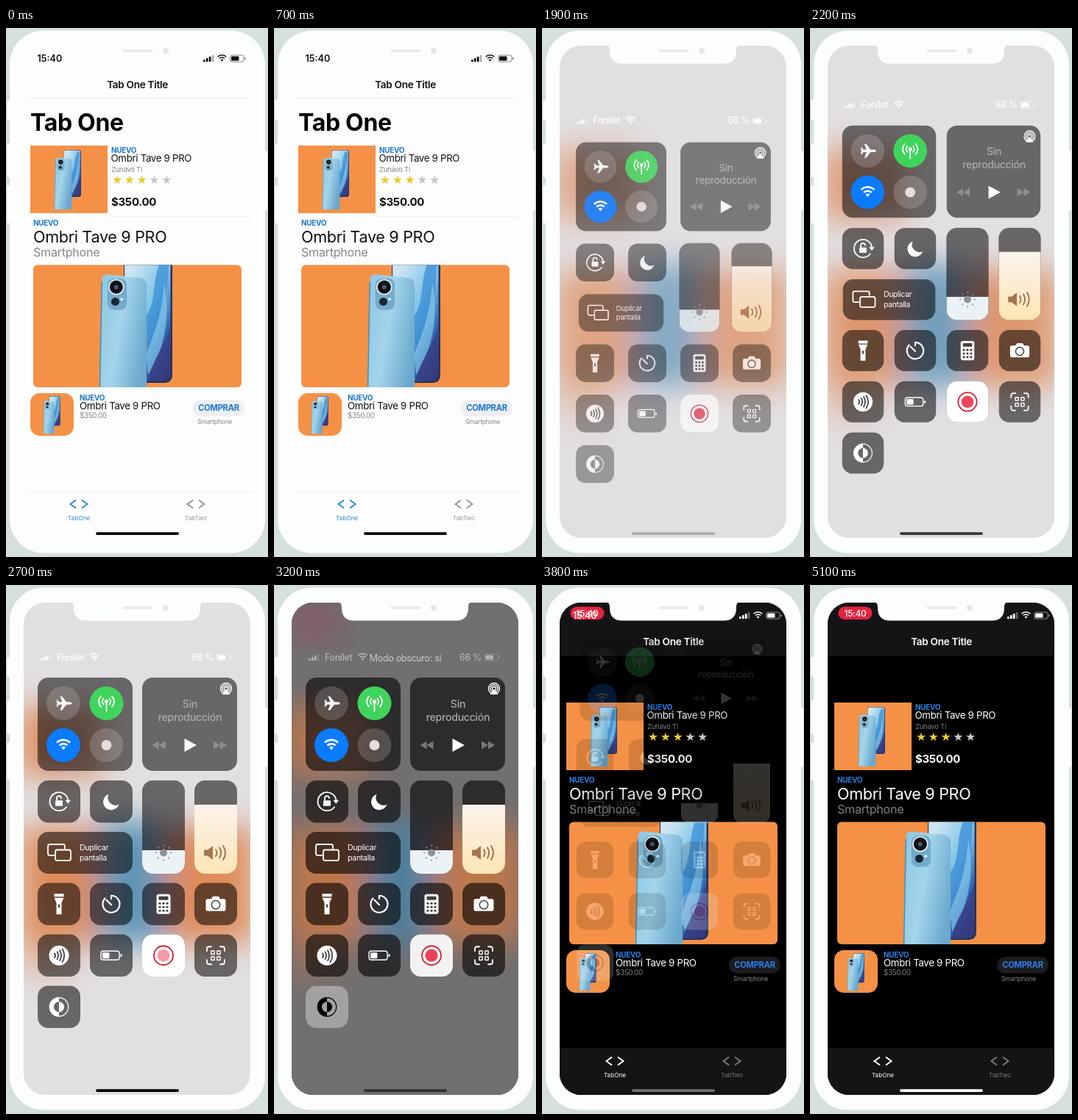
An HTML page for the animation above (5.2 s loop, 356 by 720 pixels).

```html
<!DOCTYPE html>
<html lang="es">
<head>
<meta charset="utf-8">
<style>
  html, body { margin: 0; width: 100%; height: 100%; overflow: hidden; background: #d5dfdc; }
  svg { display: block; width: 356px; height: 720px; font-family: Inter, sans-serif; letter-spacing: -.02em; }
  .tint { fill: #000; fill-opacity: var(--tint); }
  .line { fill: none; stroke: #fff; stroke-width: 1.8; stroke-linecap: round; stroke-linejoin: round; }
</style>
</head>
<body>
<svg id="stage" viewBox="0 0 356 720"></svg>
<script>
const LOOP = 5200, STEP = 100;
const PRODUCT = 'Ombri Tave 9 PRO', MAKER = 'Zunavo Ti', CARRIER = 'Fonilet';

const text = (x, y, size, fill, str, attrs = '') =>
  `<text x="${x}" y="${y}" font-size="${size}" fill="${fill}" ${attrs}>${str}</text>`;
const rect = (x, y, w, h, r, fill, attrs = '') =>
  `<rect x="${x}" y="${y}" width="${w}" height="${h}" rx="${r}" fill="${fill}" ${attrs}/>`;
const disc = (x, y, r, fill, attrs = '') => `<circle cx="${x}" cy="${y}" r="${r}" fill="${fill}" ${attrs}/>`;
const path = (d, fill = '#fff', attrs = '') => `<path d="${d}" fill="${fill}" ${attrs}/>`;
const line = (d, attrs = '') => `<path class="line" d="${d}" ${attrs}/>`;
const at = (x, y, body, scale = 1) => `<g transform="translate(${x} ${y}) scale(${scale})">${body}</g>`;
const BOLD = 'font-weight="700"', SEMI = 'font-weight="600"', MID = 'text-anchor="middle"';

const wifi = (x, y, scale, color) => at(x, y,
  `<g fill="none" stroke="${color}" stroke-width="2.6"><path d="M-9-3A13 13 0 0 1 9-3M-5.5.8A8 8 0 0 1 5.5.8"/></g>` +
  path('M0 7L-3 3.6A4.5 4.5 0 0 1 3 3.6Z', color), scale);
const bars = (x, y, color) => [0, 1, 2, 3].map(i =>
  rect(x + i * 3.9, y - 3 - i * 2, 2.7, 3 + i * 2, .7, color, i > 2 ? 'opacity=".35"' : '')).join('');
const battery = (x, y, color) =>
  rect(x, y - 4.5, 18.5, 9, 2.6, 'none', `stroke="${color}" opacity=".5"`) +
  rect(x + 1.5, y - 3, 10.5, 6, 1.3, color) + rect(x + 19.6, y - 1.7, 1.4, 3.4, .7, color, 'opacity=".5"');

const star = (x, y, fill) => {
  const pts = [...Array(10)].map((_, i) => {
    const a = i * Math.PI / 5, r = i % 2 ? 2.6 : 6.2;
    return `${(x + r * Math.sin(a)).toFixed(1)},${(y - r * Math.cos(a)).toFixed(1)}`;
  });
  return `<polygon points="${pts.join(' ')}" fill="${fill}"/>`;
};

const phones =
  rect(12, 0, 24, 64, 3.5, '#26345c') + rect(12.4, .6, 22.7, 62.6, 3, 'url(#screen)') +
  path('M22 32C29 25 25 13 31 2L34.500 4C33 17 34 33 24 46Z', '#3c8fd6', 'opacity=".75"') +
  path('M23 50C27 40 31 30 32 14C35 30 33 46 24 60Z', '#8ed4f2', 'opacity=".6"') +
  path('M24 63C25 55 32 46 35 36V60Q35 63 32 63Z', '#3d3a80', 'opacity=".7"') +
  path('M4 10.4L20 12Q23.3 12.5 23.3 16V81H-.5L1.2 13Q1.5 10 4 10.4Z', 'url(#shell)') +
  path('M1.2 14L-.1 81', 'none', 'stroke="#4f8fb4" stroke-width=".6"') +
  rect(3.9, 12.3, 9.6, 15.6, 3.2, '#74abca') +
  disc(8.3, 16.6, 3.9, '#e6f1f5') + disc(8.3, 16.6, 3.3, '#0f1218') + disc(8.3, 16.6, 1.1, '#4a5a70') +
  disc(7.8, 23.8, 2, '#1a2530') + disc(11, 22.6, .7, '#e8f4f8');

const tab = (x, name, color) =>
  path(`M${x - 4} 642.500l-7.500 5.500 7.500 5.500M${x + 4} 642.500l7.500 5.500-7.500 5.500`, 'none',
    `stroke="${color}" stroke-width="2"`) + text(x, 669.5, 8.2, color, name, MID + ' letter-spacing="0"');

function app(dark) {
  const pick = (light, night) => dark ? night : light;
  const ink = pick('#111', '#fff'), bg = pick('#fdfdfd', '#000'), bar = pick('#fdfdfd', '#141416');
  const blue = pick('#1d78cc', '#2b7fe6'), gray = pick('#88888c', '#808085'), rule = pick('#f0f0f1', '#1c1c1e');
  const orange = '#f59146';
  return rect(24, 24, 308, 670, 0, bg) + rect(24, 24, 308, 71, 0, bar) + rect(24, 631, 308, 63, 0, bar) +
    rect(27, 95, 308, 1, 0, rule) + rect(27, 630.5, 308, 1, 0, rule) + rect(138, 256, 194, 1, 0, pick('#f0f0f1', '#000')) +
    bars(268, 46, ink) + wifi(293.5, 41, .64, ink) + battery(304.5, 41.5, ink) +
    text(178.5, 82, 13.6, ink, 'Tab One Title', SEMI + MID) +
    text(33, 140, 32, '#000', 'Tab One', BOLD) +
    rect(33, 160, 105, 92, 0, orange) + at(66, 166, phones) +
    text(143, 170, 10, blue, 'NUEVO', BOLD) + text(142.5, 182, 13.3, ink, PRODUCT) +
    text(143, 196, 9.6, gray, MAKER) +
    [0, 1, 2, 3, 4].map(i => star(151 + i * 16.8, 207, i < 3 ? '#ebc92c' : '#c6c6c9')).join('') +
    text(143, 242, 15, ink, '$350.00', BOLD) +
    text(37, 269, 10, blue, 'NUEVO', BOLD) + text(37, 292, 21.6, ink, PRODUCT) +
    text(37, 310.5, 16.2, gray, 'Smartphone') +
    rect(37, 322.5, 283, 166.5, 6, orange) + `<g clip-path="url(#card)">${at(127, 307, phones, 2.75)}</g>` +
    rect(33, 497, 59, 58, 13, orange) + at(51, 501, phones, .63) +
    text(100, 507, 10, blue, 'NUEVO', BOLD) + text(100, 519, 13.3, ink, PRODUCT) +
    text(100, 531, 9.8, gray, '$350.00') +
    rect(254, 506, 70, 22.5, 11, pick('#eeeef2', '#1c1c1f')) +
    text(289, 521.3, 11.2, blue, 'COMPRAR', BOLD + MID) + text(260, 539, 8.7, gray, 'Smartphone') +
    tab(99, 'TabOne', pick('#2b8bcb', '#fff')) + tab(258, 'TabTwo', pick('#98989c', '#77777b'));
}

// Tiles are drawn around their own centre so they can shrink in place.
const tile = (x, y, w, h, body, cover = '') =>
  `<g class="tile" data-x="${x + w / 2}" data-y="${y + h / 2}" data-h="${h}">` +
  rect(-w / 2, -h / 2, w, h, 14.5, '', 'class="tint"') + cover + body + '</g>';
const COL = [43, 114, 185, 256];
const small = (col, y, body, cover) => tile(COL[col], y, 58, 57.5, body, cover);
const white = id => rect(-29, -28.75, 58, 57.5, 14.5, '#fff', `id="${id}"`);
const slider = (col, top, fill, body) =>
  tile(COL[col], 266, 58, 127, `<g clip-path="url(#slider)">${rect(-29, top, 58, 95, 0, fill)}</g>` + body);
const DIM = '#aaa7aa', HOLE = '#453f3e';

const connectivity =
  disc(-29.5, -28.5, 23, '#fff', 'opacity=".17"') + disc(29, -28.5, 23, '#40d45d') +
  disc(-29.5, 28.5, 23, '#0b7bff') + disc(29, 28.5, 23, '#fff', 'opacity=".17"') +
  at(-28.5, -28.5, path('M11 0Q10-1.8 7-1.8H3L-3-9.500H-5.500L-2.500-1.8H-7L-9-4.500H-10.500L-9.500 0L-10.500 4.500H-9L-7 1.8H-2.500L-5.500 9.500H-3L3 1.8H7Q10 1.8 11 0Z')) +
  at(29, -31, disc(0, 0, 2.6, '#fff') + line('M0 0V13M-4-4A6 6 0 0 0-4 4M4-4A6 6 0 0 1 4 4M-7.500-7A10 10 0 0 0-7.500 7M7.500-7A10 10 0 0 1 7.500 7')) +
  wifi(-29.5, 28, 1, '#fff') + disc(29, 28.5, 7, '#e4dedc');

const skip = 'M-9-5.500L0 0L-9 5.500ZM0-5.500L9 0L0 5.500Z';
const media =
  text(.5, -22.5, 14.2, DIM, 'Sin', MID + ' font-weight="500"') +
  text(.5, -4.5, 14.2, DIM, 'reproducción', MID + ' font-weight="500"') +
  path('M-7 19.500L9.500 28.500L-7 37.500Z') + at(41.5, 28.5, path(skip, DIM, 'opacity=".6"')) +
  `<g transform="translate(-42 28.500) scale(-1 1)">${path(skip, DIM, 'opacity=".6"')}</g>` +
  at(49.5, -48.5, [7.5, 5, 2.5].map(r => disc(0, 0, r, 'none', 'stroke="#fff" stroke-width="1.4"')).join('') + path('M0 1L5.500 8H-5.500Z'));

const scan = line('M-12-6V-9Q-12-12-9-12H-6M6-12H9Q12-12 12-9V-6M12 6V9Q12 12 9 12H6M-6 12H-9Q-12 12-12 9V6') +
  [[-4, -4], [4, -4], [-4, 4], [4, 4]].map(([x, y]) => rect(x - 2.2, y - 2.2, 4.4, 4.4, .5, 'none', 'stroke="#fff" stroke-width="1.4"')).join('');

const calcKeys = [...Array(9)].map((_, i) => disc((i % 3 - 1) * 5, Math.floor(i / 3) * 5 - 1, 1.6, HOLE)).join('');

const tiles =
  tile(43, 126, 129, 127, connectivity) + tile(185, 126, 129, 127, media) +
  small(0, 266, line('M10 7.500A12.500 12.500 0 1 1 12.300-2.500') + path('M8.500-2H16L12.300 3Z') +
    rect(-5, -1.5, 10, 7.5, 1.2, '#fff') + line('M-3-2V-4.500A3 3 0 0 1 3-4.500', 'stroke-width="1.5"')) +
  small(1, 266, path('M-3.500-10A11 11 0 1 0 10.500 4A10.500 10.500 0 0 1-3.500-10Z')) +
  slider(2, 31.5, '#eaf2f5', at(0, 35, disc(0, 0, 5, '#8d9297') +
    disc(0, 0, 10, 'none', 'stroke="#8d9297" stroke-width="2.2" stroke-linecap="round" stroke-dasharray="0 7.854"'))) +
  slider(3, -30.5, 'url(#warm)', at(-1, 35, path('M-15-4H-10L-3-9.500V9.500L-10 4H-15Z', '#a5754f') +
    path('M1-4.500Q4 0 1 4.500M6-7Q10.500 0 6 7M11-9.500Q17 0 11 9.500', 'none', 'stroke="#a5754f" stroke-width="2" stroke-linecap="round"'))) +
  tile(43, 336, 129, 57, line('M-42.500 3.500H-48Q-50.500 3.500-50.500 1V-9Q-50.500-11.500-48-11.500H-30Q-27.500-11.500-27.500-9V-6') +
    rect(-40.5, -4, 21, 14.5, 2.5, 'none', 'class="line"') +
    text(-7.5, -3.5, 10.6, '#fff', 'Duplicar') + text(-7.5, 10.5, 10.6, '#fff', 'pantalla')) +
  small(0, 405.5, path('M-6.500-14H6.500V-10H-6.500ZM-6.500-8.500H6.500L3.500-2V14H-3.500V-2Z') + rect(-1, 0, 2, 5, 1, HOLE)) +
  small(1, 405.5, line('M0-11.500A11.500 11.500 0 1 1-8.500-7.800M0-11.500V-7M0 1L-6.500-5.500', 'style="stroke-width:2.2"')) +
  small(2, 405.5, rect(-9.5, -13.5, 19, 27, 3, '#fff') + rect(-6.5, -10.5, 13, 5, 1, HOLE) + calcKeys) +
  small(3, 405.5, path('M-11-7H-6L-4-10.500H4L6-7H11Q13.500-7 13.500-4.500V7Q13.500 9.500 11 9.500H-11Q-13.500 9.500-13.500 7V-4.500Q-13.500-7-11-7Z') +
    disc(0, 1, 5.7, 'none', `stroke="${HOLE}" stroke-width="1.5"`)) +
  small(0, 475.5, disc(0, 0, 13.5, '#fff') + path('M-6-3Q-4 0-6 3M-2.500-5Q.500 0-2.500 5M1-7Q5 0 1 7M4.500-9Q10 0 4.500 9', 'none', `stroke="${HOLE}" stroke-width="1.8" stroke-linecap="round"`)) +
  small(1, 475.5, rect(-14, -6, 25, 12, 3, 'none', 'class="line" style="stroke-width:1.4"') + rect(-12, -4, 9.5, 8, 1.4, '#fff') + rect(12.5, -2, 2, 4, 1, '#fff')) +
  small(2, 475.5, disc(0, 0, 13, 'none', 'stroke="#d81f35" stroke-width="1.8"') + disc(0, 0, 8.5, '#e81f3c', 'id="recordDot"'), white('recordTile')) +
  small(3, 475.5, scan) +
  small(0, 545.5, `<g id="modeIcon">${disc(0, 0, 12.7, 'none', 'stroke-width="1.2"') +
    '<path d="M0-13A13 13 0 0 0 0 13V7A7 7 0 0 1 0-7ZM0-7A7 7 0 0 1 0 7Z" stroke="none"/>'}</g>`, white('modeTile'));

stage.innerHTML = `
<defs>
  <linearGradient id="shell" x2="1" y2=".5"><stop stop-color="#8cc6e2"/><stop offset=".5" stop-color="#a3d4ea"/><stop offset="1" stop-color="#6aa8ce"/></linearGradient>
  <linearGradient id="screen" x1=".3" x2="1" y2="1"><stop stop-color="#cfe6f2"/><stop offset=".4" stop-color="#7fc3e8"/><stop offset=".7" stop-color="#2f66b2"/><stop offset="1" stop-color="#272f60"/></linearGradient>
  <linearGradient id="warm" x2="0" y2="1"><stop stop-color="#fbf3ec"/><stop offset="1" stop-color="#fde5b4"/></linearGradient>
  <filter id="soft" x="-30%" y="-30%" width="160%" height="160%"><feGaussianBlur stdDeviation="20"/></filter>
  <clipPath id="glass">${rect(24, 24, 308, 670, 29, '#000')}</clipPath>
  <clipPath id="card">${rect(37, 322.5, 283, 166.5, 6, '#000')}</clipPath>
  <clipPath id="slider">${rect(-29, -63.5, 58, 127, 14.5, '#000')}</clipPath>
</defs>
${rect(0, 0, 356, 720, 0, '#d5dfdc')}
${rect(1.5, 98, 8, 27, 2, '#fcfdfd') + rect(1.5, 157, 8, 46, 2, '#fcfdfd') + rect(1.5, 214, 8, 52, 2, '#fcfdfd') + rect(347, 167, 8, 81, 2, '#fcfdfd')}
${rect(5, 3.5, 347, 711, 46, '#fcfdfd')}
<g clip-path="url(#glass)">
  <g id="light">${app(false)}</g><g id="night">${app(true)}</g>
  <g id="clock">${text(42.5, 46, 12.6, '#111', '15:40', SEMI + ' letter-spacing="0"')}</g>
  <g id="pill">${rect(38.5, 29.5, 46, 17.5, 8.7, '#e0263f')}
    <g id="pillDot">${disc(61.5, 38.3, 5.2, 'none', 'stroke="#fff" stroke-width="1.2"') + disc(61.5, 38.3, 2.8, '#fff')}</g>
    <g id="pillTime">${text(61.5, 42.7, 12, '#fff', '15:40', MID + ' font-weight="500"')}</g>
  </g>
  <g id="ghost">${text(42, 46, 12.6, '#fff', '15:40', SEMI)}</g>
  <g id="backdrop">
    ${rect(24, 24, 308, 670, 0, '#e2dfe2') + rect(24, 24, 308, 670, 0, '#2f2c2e', 'id="shade"')}
    <g id="blobs" filter="url(#soft)">
      ${rect(20, 165, 108, 95, 0, '#dd7a3c') + rect(20, 330, 316, 158, 0, '#dd7a3c') + rect(24, 490, 64, 40, 0, '#dd7a3c', 'opacity=".5"')}
      ${rect(72, 175, 28, 70, 0, '#9a8f93') + rect(125, 322, 92, 166, 0, '#3f86ae')}
    </g>
    <g id="redGlow" filter="url(#soft)">${rect(24, 24, 66, 50, 0, '#a8304a')}</g>
  </g>
  <g id="panel">
    <g id="status">${bars(47, 103, '#fff') + text(69, 102.5, 12.4, '#fff', CARRIER, 'font-weight="500"') + wifi(120.5, 98, .7, '#fff') +
      text(252, 102.5, 12.4, '#fff', '66 %', 'font-weight="500"') + battery(286, 98.5, '#fff')}</g>
    ${tiles}
  </g>
  <g id="label">${text(178.5, 103.5, 12.5, '#fff', 'Modo obscuro: sí', MID)}</g>
</g>
${path('M85 23C91 23 92 26 92 31Q92 48.500 109 48.500H247Q264 48.500 264 31C264 26 265 23 271 23Z', '#fcfdfd')}
${rect(158, 29, 42, 4, 2, '#ececec') + disc(217, 31, 4.5, '#ececec') + disc(217, 31, 2, '#dedede')}
${rect(122, 686.2, 113, 3.7, 1.8, '#000', 'id="home"')}`;

// Piecewise linear value at time t through [time, value] pairs.
function track(t, ...keys) {
  const next = keys.findIndex(k => k[0] > t);
  if (next === 0) return keys[0][1];
  if (next < 0) return keys.at(-1)[1];
  const [t0, a] = keys[next - 1], [t1, b] = keys[next];
  return a + (b - a) * (t - t0) / (t1 - t0);
}

const $ = id => document.getElementById(id);
const fade = (id, value) => $(id).setAttribute('opacity', value);
const tileNodes = [...document.querySelectorAll('.tile')];

function draw(t) {
  const dark = track(t, [2950, 0], [3350, 1]);
  const night = t >= 3200, recording = t >= 900;
  const cover = track(t, [1600, 0], [1800, .9], [1900, 1], [3600, 1], [3700, .55], [3800, 0]);
  const open = track(t, [1600, 0], [1800, .8], [1900, .97], [2200, 1], [3600, 1], [3700, .65], [3800, .2], [3900, 0]);
  const shift = track(t, [1600, -50], [1800, 15], [1900, 30], [2000, 20], [2300, 0], [3600, 0], [3700, -28], [3800, -60], [3900, -75]);
  const inset = track(t, [1600, 14], [1900, 6], [2300, 0]);
  const size = track(t, [3600, 1], [3700, .94], [3800, .87], [3900, .82]);
  const lag = track(t, [1600, .7], [1900, .4], [2200, 0]);

  fade('light', +!night);
  fade('night', +night);
  fade('clock', +!recording);
  fade('pill', +recording);
  fade('pillDot', +!night);
  fade('pillTime', +night);
  fade('ghost', track(t, [3600, 0], [3700, .9], [3800, .9], [3900, 0]));

  fade('backdrop', cover);
  fade('shade', dark);
  fade('blobs', track(t, [1600, .4], [1900, .58], [2500, .82]) - .17 * dark);
  fade('redGlow', .5 * dark);

  fade('panel', open);
  fade('status', 1 - .87 * dark);
  $('status').setAttribute('transform', `translate(0 ${shift * .93})`);
  stage.style.setProperty('--tint', .54 + .1 * dark);
  for (const node of tileNodes) {
    const { x, y, h } = node.dataset;
    const top = +y + shift - Math.max(shift, 0) * .00062 * y;
    node.setAttribute('transform', `translate(${x} ${top}) scale(${size - inset / h})`);
    node.setAttribute('opacity', 1 - lag * y / 600);
  }
  fade('recordDot', .72 + .28 * Math.cos((t - 1900) / 1600 * 2 * Math.PI));
  fade('recordTile', 1 - .1 * dark);
  fade('modeTile', .9 * dark);
  const tone = dark > .5 ? '#000' : '#fff';
  $('modeIcon').setAttribute('fill', tone);
  $('modeIcon').setAttribute('stroke', tone);
  fade('label', track(t, [3050, 0], [3300, 1], [3600, 1], [3750, 0]));

  const gray = track(t, [1600, 0], [1900, 172], [2000, 172], [2300, 0], [3000, 0], [3400, 98], [3800, 112], [4300, 255]);
  $('home').setAttribute('fill', `rgb(${gray},${gray},${gray})`);
}

function tick(now) {
  draw(Math.floor(now % LOOP / STEP) * STEP);
  requestAnimationFrame(tick);
}
tick(performance.now());
</script>
</body>
</html>
```
